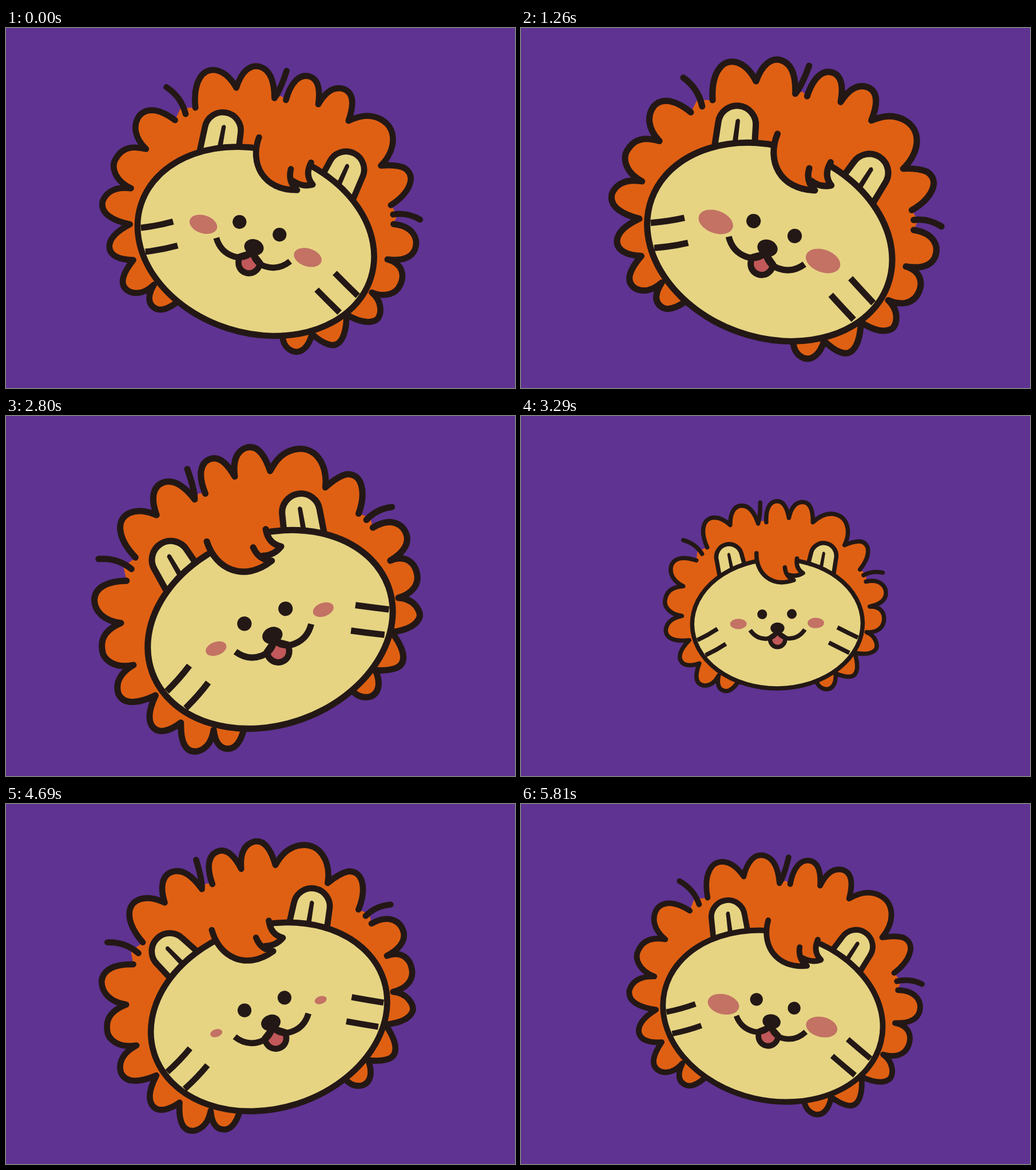
Recreate the animation shown at these times as an HTML page. Size 890 by 629 pixels, loop 5880 ms.

```html
<!DOCTYPE html>
<html lang="en">
<head>
<meta charset="utf-8">
<title>Lion</title>
<style>
html, body { margin: 0; width: 100%; height: 100%; overflow: hidden; background: #5f3392; }
svg { display: block; width: 890px; height: 629px; }
.line { fill: none; stroke: #231815; stroke-width: 7.4; stroke-linecap: round; stroke-linejoin: round; }
.cream { fill: #e6d483; }
.orange { fill: #df6013; }
.dark { fill: #231815; }
.blush { fill: #c37264; }
.butt { stroke-linecap: butt; }
</style>
</head>
<body>
<svg viewBox="0 0 890 629">
  <defs>
    <g id="ear">
      <path class="line cream" style="fill:#e6d483" d="M-24 8L-22 -36A22 22 0 0 1 22 -36L24 8"/>
      <path class="dark" d="M-2 -41Q1 -45 3 -41L3 -5H-3.5Z"/>
    </g>
  </defs>
  <g id="head">
    <path id="mane" class="orange"/>
    <path id="maneLine" class="line"/>
    <use href="#ear" id="earL"/>
    <use href="#ear" id="earR"/>
    <ellipse class="line" style="fill:#e6d483" cx="448" cy="362.5" rx="146.5" ry="111"/>
    <path class="orange" d="M413.5 241C412 275 438 301 477 288L469 280Q482 283 493 276Q480 268 483 251L484 234H414Z"/>
    <path class="line" d="M413.5 241C412 275 438 301 477 288Q463 282 462 266M469 279Q482 283 493 276Q480 268 483 251"/>
    <path class="line butt" d="M310 389Q328 381 345 370M324 415Q342 407 359 396M551 370Q568 379 586 388M536 396Q553 405 571 414"/>
    <ellipse class="blush" cx="381" cy="362"/>
    <ellipse class="blush" cx="514" cy="362"/>
    <circle class="dark" cx="422" cy="346" r="8.4"/>
    <circle class="dark" cx="473" cy="346" r="8.4"/>
    <path class="line" style="fill:#c1585a" d="M435 386C433 408 463 408 461 386L448 377Z"/>
    <path class="line butt" d="M401 373Q411 388 428 388Q441 388 448 376Q455 388 468 388Q485 388 495 373"/>
    <ellipse class="dark" cx="448" cy="370" rx="12" ry="9.7"/>
  </g>
</svg>
<script>
const $ = id => document.getElementById(id);
const LOOP = 5880, STEP = 70;

// Mane outline, clockwise from the bottom left, and the loose hairs
const left = 'M379 462C371 473 364 478 357 477C344 475 343 462 346 450C340 461 331 468 320 467' +
  'C304 464 306 447 313 429C297 434 283 433 280 421C278 412 284 401 296 389C276 391 257 388 256 372' +
  'C257 358 268 350 284 347C262 344 252 329 256 317C259 303 270 297 287 296' +
  'C269 287 263 273 267 260C273 246 290 245 310 252';
const top1 = 'M329 230C316 200 323 179 342 179Q355 179 369 192C369 172 376 159 389 159Q407 159 417 190';
const top2 = 'M431 188C430 166 437 152 450 152Q465 152 470 181C474 163 482 154 494 154Q512 155 511 189' +
  'C523 178 533 174 545 175C571 178 577 205 565 229Q582 222 593 223C612 228 607 252 591 271';
const right = 'M601 292C625 287 636 300 635 314Q633 330 607 335C626 334 633 347 631 360' +
  'C629 374 616 380 601 379C618 386 620 402 617 408Q608 420 580 414C588 440 584 455 570 455' +
  'Q560 455 547 449C548 465 542 476 531 476C520 475 516 468 512 460';
const hairs = 'M288 217Q309 223 320 241M417 190Q421 178 421 154M597 281Q612 273 630 277';
$('mane').setAttribute('d', (left + 'L312 236' + top1 + 'L424 185' + top2 + 'L602 280' + right).replace(/(?!^)M/g, 'L'));
$('maneLine').setAttribute('d', left + top1 + top2 + right + hairs);

// Keys: [time, value]
const tilt = [[-121, 20], [439, 0], [530, 0], [1090, 20], [1260, 20], [1820, 0], [2060, 0], [2630, -20],
  [2793, -20], [3353, 0], [3839, 0], [4399, -20], [4567, -20], [5129, 0], [5400, 0], [6080, 20]];
// Pulses, counted in turns
const earTurns = [[0, 0], [1260, 3.18], [2030, 5], [2800, 6.86], [3990, 10], [4690, 11.5], [5880, 14.48]];
const blushTurns = [[0, -.16], [1260, 1.03], [2030, 1.87], [2800, 2.74], [3990, 3.92], [4690, 4.63], [5880, 6.07]];

const linear = u => u;
const smooth = u => u * u * (3 - 2 * u);

function at(keys, t, ease) {
  const i = keys.findIndex(k => k[0] > t);
  const [t0, a] = keys[i - 1], [t1, b] = keys[i];
  return a + (b - a) * ease((t - t0) / (t1 - t0));
}

const wave = turns => Math.cos(2 * Math.PI * turns);

function draw(now) {
  const t = Math.floor(now % LOOP / STEP) * STEP;
  const angle = at(tilt, t, smooth);
  const scale = 1 + Math.abs(angle) / 40;
  const flare = 18 - 10 * wave(at(earTurns, t, linear));
  const r = 13 + 8 * wave(at(blushTurns, t, linear));
  $('head').setAttribute('transform', `translate(447 336) rotate(${angle}) scale(${scale}) translate(-447 -336)`);
  $('earL').setAttribute('transform', `translate(374 282) rotate(${-flare})`);
  $('earR').setAttribute('transform', `translate(521 282) rotate(${flare}) scale(-1 1)`);
  for (const e of document.querySelectorAll('.blush')) {
    e.setAttribute('rx', r);
    e.setAttribute('ry', r * .63);
  }
}

const start = performance.now();
function tick() {
  draw(performance.now() - start);
  requestAnimationFrame(tick);
}
tick();
</script>
</body>
</html>
```
